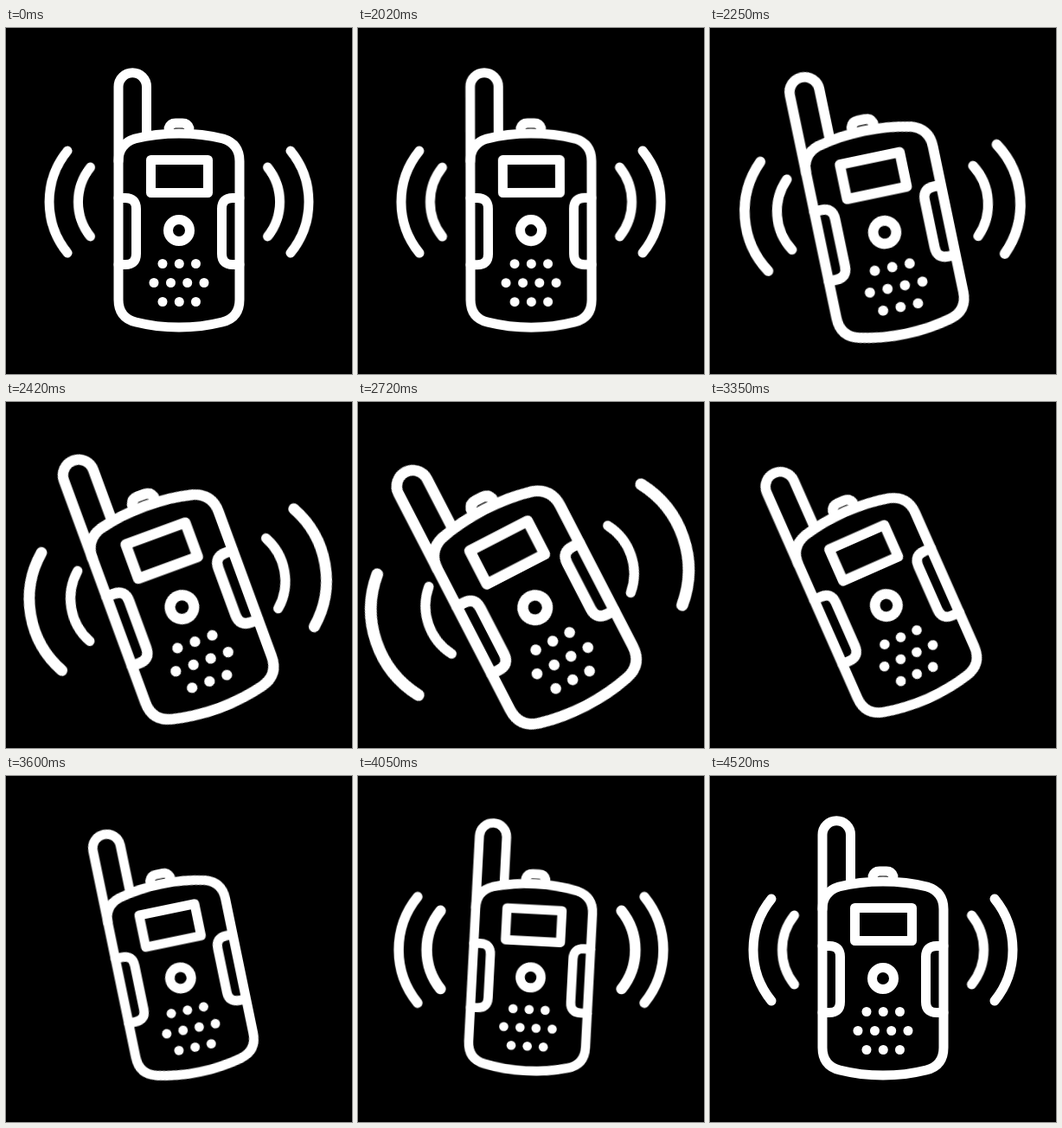
Animation of 400x400 px, one loop 4550 ms. Source, as an HTML page:

```html
<!DOCTYPE html>
<html lang="en">
<head>
<meta charset="utf-8">
<title>Walkie-talkie</title>
<style>
  html, body { margin: 0; width: 100%; height: 100%; overflow: hidden; background: #000; }
  svg { display: block; width: 100vw; height: 100vh; }
  .line { fill: none; stroke: #fff; stroke-width: 11; stroke-linecap: round; stroke-linejoin: round; }
  .solid { fill: #fff; }

  .zoom, .tilt, .sway, .inner, .outer {
    animation: 4550ms linear infinite;
    transform-box: view-box;
  }
  .zoom { transform-origin: 200px 200px; animation-name: zoom; }
  .tilt { transform-origin: 200px 225px; animation-name: tilt; }
  .sway, .inner, .outer { transform-origin: 0 0; }
  .sway { animation-name: sway; }
  .inner { animation-name: inner, inner-blink; }
  .outer { animation-name: outer, outer-blink; }

  @keyframes zoom {
    0% { transform: scale(1); }
    43.96% { transform: scale(1); animation-timing-function: cubic-bezier(.2, 0, .2, 1); }
    64.9% { transform: scale(1.146); }
    68.13% { transform: scale(1.146); animation-timing-function: cubic-bezier(.2, 0, .2, 1); }
    87.91% { transform: scale(.965); animation-timing-function: cubic-bezier(.33, 0, .67, 1); }
    99.34%, 100% { transform: scale(1); }
  }
  @keyframes tilt {
    0% { transform: rotate(0deg); }
    43.96% { transform: rotate(0deg); animation-timing-function: cubic-bezier(.2, 0, .2, 1); }
    68.13% { transform: rotate(-29.6deg); animation-timing-function: cubic-bezier(.33, 0, .67, 1); }
    88.79% { transform: rotate(3deg); animation-timing-function: cubic-bezier(.33, 0, .67, 1); }
    99.34%, 100% { transform: rotate(0deg); }
  }
  @keyframes sway {
    0% { transform: translate(200px, 201px) rotate(0deg); }
    43.96% { transform: translate(200px, 201px) rotate(0deg); animation-timing-function: ease-in; }
    53.19% { transform: translate(198.7px, 217px) rotate(-9.8deg); animation-timing-function: ease-out; }
    65% { transform: translate(198.5px, 217px) rotate(-21.9deg); }
    68.13% { transform: translate(198.5px, 217px) rotate(-21.9deg); animation-timing-function: cubic-bezier(.33, 0, .67, 1); }
    88.5%, 100% { transform: translate(200px, 201px) rotate(0deg); }
  }
  @keyframes inner {
    0% { transform: translateX(-116.5px) scale(1); }
    43.96% { transform: translateX(-116.5px) scale(1); animation-timing-function: ease-in-out; }
    53.19% { transform: translateX(-125px) scale(1.03); }
    68.13% { transform: translateX(-122px) scale(1.02); }
    89.01% { transform: translateX(-120.5px) scale(1.13); animation-timing-function: ease-out; }
    98%, 100% { transform: translateX(-116.5px) scale(1); }
  }
  @keyframes outer {
    0% { transform: translateX(-150px) scale(1); }
    43.96% { transform: translateX(-150px) scale(1); animation-timing-function: ease-in; }
    53.19% { transform: translateX(-172.5px) scale(1.17); animation-timing-function: ease-out; }
    56.3% { transform: translateX(-188px) scale(1.25); }
    68% { transform: translateX(-186px) scale(1.25); }
    89.01% { transform: translateX(-153px) scale(1.04); animation-timing-function: ease-out; }
    97%, 100% { transform: translateX(-150px) scale(1); }
  }
  @keyframes inner-blink {
    0%, 81.32% { opacity: 1; animation-timing-function: step-end; }
    70.33% { opacity: 0; animation-timing-function: step-end; }
    100% { opacity: 1; }
  }
  @keyframes outer-blink {
    0%, 83.52% { opacity: 1; animation-timing-function: step-end; }
    67.91% { opacity: 0; animation-timing-function: step-end; }
    100% { opacity: 1; }
  }
</style>
</head>
<body>
<svg viewBox="0 0 400 400">
  <defs>
    <path id="small-arc" d="M14 -40A64 64 0 0 0 14 40"/>
    <path id="large-arc" d="M21 -59A93.4 93.4 0 0 0 21 59"/>
    <path id="grip" d="M130 196.5H138Q150.5 196.5 150.5 209V261Q150.5 273.5 138 273.5H130"/>
    <circle id="dot" r="5.5"/>
    <g id="trio">
      <use href="#dot" x="181"/><use href="#dot" x="200.3"/><use href="#dot" x="219.5"/>
    </g>
  </defs>

  <g class="sway line">
    <g>
      <g class="inner"><use href="#small-arc"/></g>
      <g class="outer"><use href="#large-arc"/></g>
    </g>
    <g transform="scale(-1 1)">
      <g class="inner"><use href="#small-arc"/></g>
      <g class="outer"><use href="#large-arc"/></g>
    </g>
  </g>

  <g class="zoom"><g class="tilt">
    <g class="line">
      <path d="M130 154V68A16.25 16.25 0 0 1 162.5 68V124"/>
      <path d="M130 154Q130 134 149 128C165 124 182 122 200 122S235 124 251 128Q270 134 270 154V314
               Q270 335 250 340C234 344 218 346 200 346S166 344 150 340Q130 335 130 314Z"/>
      <path d="M188 116Q190 110 196 110H204Q210 110 212 116"/>
      <rect x="167.5" y="152.5" width="66" height="38"/>
      <use href="#grip"/>
      <use href="#grip" transform="matrix(-1 0 0 1 400 0)"/>
      <circle cx="200" cy="234" r="12.5"/>
    </g>
    <g class="solid">
      <use href="#trio" y="272.5"/>
      <use href="#dot" x="171" y="294.5"/><use href="#dot" x="190.5" y="294.5"/>
      <use href="#dot" x="209.7" y="294.5"/><use href="#dot" x="229" y="294.5"/>
      <use href="#trio" y="316.5"/>
    </g>
  </g></g>
</svg>
</body>
</html>
```
